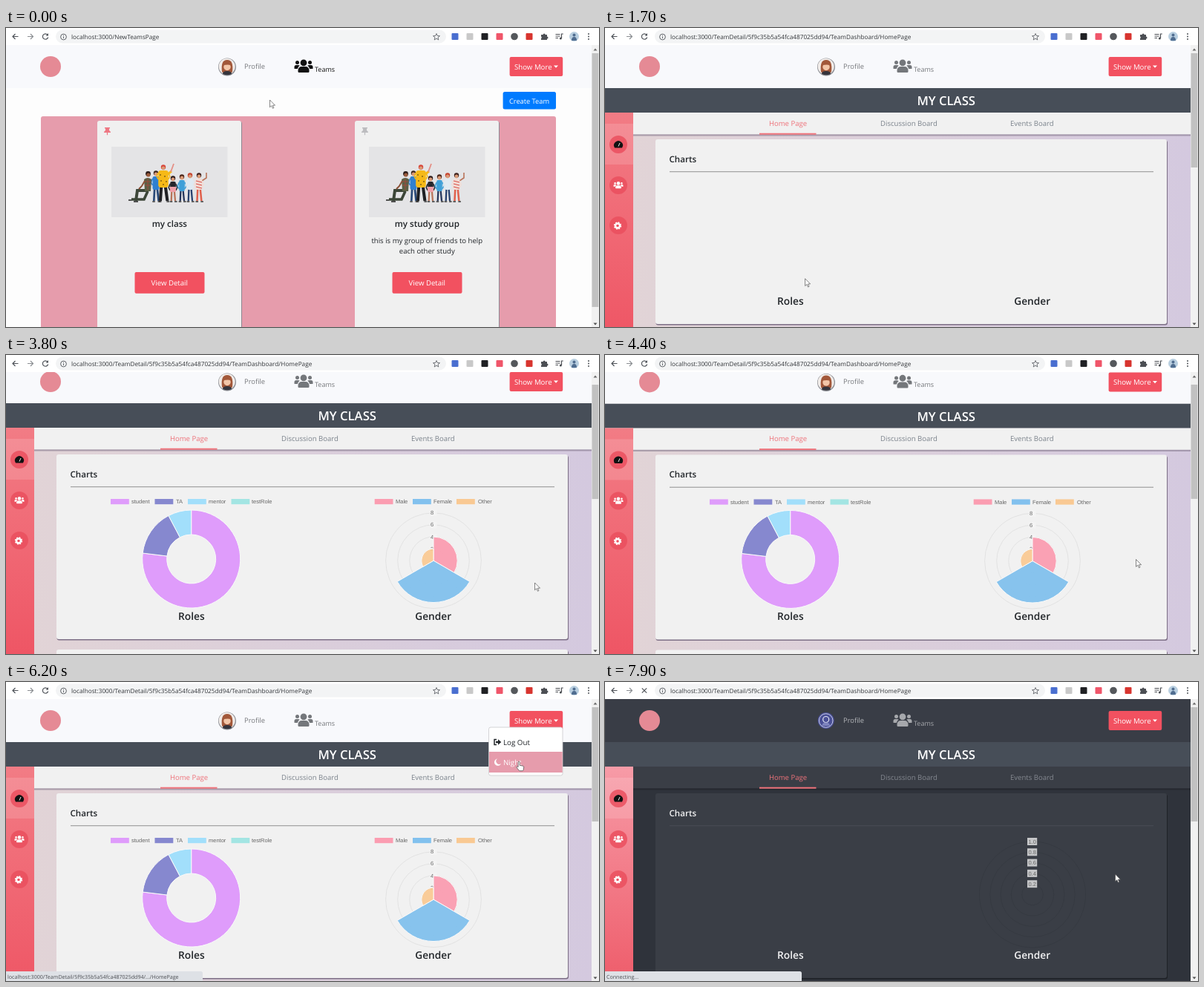
An HTML page that plays this animation: 799 px wide and 403 px high, repeating every 8000 ms.

```html
<!DOCTYPE html>
<html lang="en">
<head>
<meta charset="utf-8">
<title>Team dashboard</title>
<style>
html, body { margin: 0; width: 100%; height: 100%; overflow: hidden; background: #fff; }
svg { display: block; width: 100vw; height: 100vh; text-rendering: geometricPrecision;
  font-family: "Open Sans", "Noto Sans", sans-serif;
  --nav: #f8f9fc; --ink: #212529; --dim: #77797d; --tab: #7a828b; --panel: #f1f1f1; --line: #858585;
  --bar: #474e58; --shade: #7d6f86; --teams: #111; }
svg.dash { --teams: #74777b; }
svg.night { --nav: #393d46; --ink: #f3f3f4; --dim: #b4b6ba; --tab: #858991; --panel: #3a3e46;
  --line: #4a4e57; --shade: #1f2227; --teams: #a6a8ac; }
.b { font-weight: 600; }
.arial { font-family: "Liberation Sans", Arial, sans-serif; font-size: 7.5px; fill: #666; }
.mid { text-anchor: middle; }
.page2 { fill: url(#lilac); }
.night .page2 { fill: #2f333b; }
.rail { fill: url(#coral); }
.night .rail { fill: url(#rose); }
.hot { fill: #fa717c; }
.cool { fill: #f25160; }
</style>
</head>
<body>
<svg id="stage" viewBox="0 0 799 403" preserveAspectRatio="none"></svg>
<script>
const stage = document.getElementById('stage');
const LOOP = 8000;

// ---- drawing helpers
const rect = (x, y, w, h, fill, more = '') =>
  `<rect x="${x}" y="${y}" width="${w}" height="${h}" fill="${fill}" ${more}/>`;
const circle = (x, y, r, fill, more = '') => `<circle cx="${x}" cy="${y}" r="${r}" fill="${fill}" ${more}/>`;
const path = (d, fill = 'none', more = '') => `<path d="${d}" fill="${fill}" ${more}/>`;
const line = (d, color, w) => path(d, 'none', `stroke="${color}" stroke-width="${w}"`);
const text = (x, y, size, str, fill = 'var(--ink)', cls = '') =>
  `<text x="${x}" y="${y}" class="${cls}" style="font-size:${size}px;fill:${fill}">${str}</text>`;
const small = (x, y, str, cls = '') => `<text x="${x}" y="${y}" class="arial ${cls}">${str}</text>`;
const group = (id, body, more = '') => `<g id="${id}" ${more}>${body}</g>`;
const put = (x, y, body, scale = 1) => `<g transform="translate(${x} ${y}) scale(${scale})">${body}</g>`;

const users = fill => `<g fill="${fill}">
  <circle cx="12.5" cy="4.6" r="4.4"/><circle cx="4" cy="4.4" r="2.5"/><circle cx="21" cy="4.4" r="2.5"/>
  <path d="M5 16.5v-2a4.6 4.6 0 0 1 4.6-4.6h5.8a4.6 4.6 0 0 1 4.6 4.6v2q0 1.3-1.3 1.3H6.3Q5 17.8 5 16.5z
  M0 12.3v-2a2.6 2.6 0 0 1 2.6-2.6h2.6q1.2 0 2 .8-2.2 1.3-2.8 4.300H.8Q0 12.8 0 12.3z
  M25 12.3v-2a2.6 2.6 0 0 0-2.6-2.6h-2.6q-1.2 0-2 .8 2.2 1.3 2.8 4.3h3.600q.8 0 .8-.5z"/></g>`;

function polar(cx, cy, r, a) {
  const k = (a - 90) * Math.PI / 180;
  return (cx + r * Math.cos(k)).toFixed(2) + ' ' + (cy + r * Math.sin(k)).toFixed(2);
}
function sector(cx, cy, r0, r1, a0, a1) {
  const big = a1 - a0 > 180 ? 1 : 0, p = (r, a) => polar(cx, cy, r, a);
  return `M${p(r1, a0)}A${r1} ${r1} 0 ${big} 1 ${p(r1, a1)}L${p(r0, a1)}` +
    (r0 ? `A${r0} ${r0} 0 ${big} 0 ${p(r0, a0)}z` : 'z');
}

// ---- browser frame
function toolbar() {
  const ext = [[605, '#4a6fd0'], [625, '#c9c9c9'], [645, '#202124'], [665, '#f0566a'], [685, '#55585c'], [705, '#d8352f']];
  const dark = '#50545a';
  return rect(0, 0, 799, 23, '#fff') + rect(67, 2.5, 526, 18, '#f3f4f5', 'rx="9"') +
    line('M16.5 11.5H9M12.5 8L9 11.5L12.5 15', dark, 1.2) +
    line('M29 11.5H36.5M33 8L36.5 11.5L33 15', '#8b8e92', 1.2) +
    group('reload', line('M56 9.2A3.7 3.7 0 1 0 56.7 12.5', dark, 1.2) + path('M57 7v3.5h-3.5z', dark)) +
    group('stop', line('M49.8 8.3L56.2 14.7M56.2 8.3L49.8 14.7', dark, 1.2)) +
    circle(77.5, 12, 3.9, 'none', `stroke="${dark}" stroke-width=".9"`) + line('M77.5 11.5v2.5M77.5 9.6v1', dark, .9) +
    group('urlA', text(88, 15, 8.2, 'localhost:3000/NewTeamsPage', '#33363a')) +
    group('urlB', text(88, 15, 8.24, 'localhost:3000/TeamDetail/5f9c35b5a54fca487025dd94/TeamDashboard/HomePage', '#33363a')) +
    path('M580 7.5l1.3 3 3.2.2-2.5 2.1.8 3.2-2.8-1.8-2.8 1.8.8-3.2-2.5-2.1 3.2-.2z', 'none', `stroke="${dark}" stroke-width=".8"`) +
    ext.map(([x, c], i) => i == 4 ? circle(x, 11.5, 4.8, c)
      : rect(x - 4.5, 7, 9, 9, c, `rx="1" ${i == 5 ? 'id="badge"' : ''}`)).join('') +
    group('blank', rect(700.5, 7, 9, 9, '#f1f1f1', 'stroke="#ddd" stroke-width=".6"')) +
    path('M721 9h2.6a1.5 1.5 0 0 1 3 0H729v2.6a1.5 1.5 0 0 1 0 3V16h-8v-2a1.5 1.5 0 0 0 0-2.6z', '#4c4f54') +
    line('M740.5 8.5h6M740.5 11h6M740.5 13.5h3.5M748.5 14V8h2.3', '#4c4f54', 1.2) + circle(747.3, 14, 1.5, '#4c4f54') +
    circle(765.5, 11.5, 6.5, '#b9cfe0') + path('M762 17q0-5 3.5-5t3.5 5z', '#506d90') + circle(765.5, 9.5, 2, '#506d90') +
    [8, 11.5, 15].map(y => circle(785, y, 1, dark)).join('');
}

function scrollbar() {
  return rect(789, 23, 10, 380, '#f1f1f1') + path('M791.5 30.5l2.5-3 2.5 3z', '#6a6a6a') +
    path('M791.5 397.5l2.5 3 2.5-3z', '#505050') + rect(789.5, 34, 8.8, 154, '#c1c1c1', 'id="thumb"');
}

function status() {
  return group('status', path('M0 390H262.5q2.5 0 2.5 2.5V403H0z', '#dee1e6') +
    group('link', text(2, 400.3, 7.1, 'localhost:3000/TeamDetail/5f9c35b5a54fca487025dd94/.../HomePage', '#4a4d52')) +
    group('wait', text(2, 400.3, 7.1, 'Connecting...', '#4a4d52')));
}

// ---- page pieces
function nav() {
  return rect(0, 23, 789, 58, 'var(--nav)') + circle(60, 52, 14, '#e58a95') +
    group('face', circle(298, 52.5, 12, '#8d8f95') + circle(297.7, 52, 11, '#f1ece9') +
      path('M291 59q-2-16 7-16t7 16l-2 2h-10z', '#a2583a') + circle(298, 52.5, 4.7, '#f3c6a8') +
      path('M293 50q2-4 5-3.5t5 3.5q-4-1-10 0z', '#a2583a') + path('M292 62q0-4 6-4t6 4q-6 2.5-12 0z', '#34343c')) +
    group('blankFace', circle(297.7, 52, 11, '#4a5096') + circle(297.7, 52, 9.3, 'none', 'stroke="#d9dcf2" stroke-width=".9"') +
      circle(297.7, 50.5, 4, 'none', 'stroke="#e6e8f6" stroke-width="1.2"') + path('M292.5 59q0-4.5 5.2-4.5t5.2 4.5', '#7d83bd')) +
    text(321, 54.5, 9.35, 'Profile', 'var(--dim)') + put(388.5, 42.2, users('var(--teams)')) +
    text(416, 58.8, 9, 'Teams', 'var(--teams)') +
    rect(678.6, 39, 71.6, 26, '', 'id="more" rx="2"') + text(685, 56, 9.66, 'Show More', '#fff') + path('M738 50.5h6l-3 3.3z', '#fff');
}

// x, head y, hip y, half width, top, legs, hair
const crowd = [
  [202, 196, 216, 4.5, '#2f80d0', '#2a4a78', '#3a241c'],
  [212, 188, 213, 6.8, '#f6b917', '#1f2024', '#d8453a'],
  [225, 203, 216, 3.8, '#26262c', '#b9745a', '#2a1a1a'],
  [237, 201, 218, 3.8, '#3fa0d8', '#26365c', '#4a2418'],
  [248, 199, 216, 3.8, '#dfeaf2', '#27416f', '#c5402c'],
  [260, 199, 216, 4.2, '#f2ddd6', '#e0604c', '#3b1f1c']
];
function person([x, y, hip, w, top, legs, hair]) {
  return line(`M${x - w * .4} ${hip}L${x - w * .6} 233M${x + w * .4} ${hip}L${x + w * .8} 233`, legs, w * .6) +
    rect(x - w, y + 4, w * 2, hip - y - 2, top, `rx="${w * .5}"`) +
    line(`M${x - w} ${y + 7}l-2 5 2 4M${x + w} ${y + 7}l2 5-2 4`, top, 1.6) +
    circle(x, y - .6, 3.2, hair) + circle(x, y + 1, 2.4, '#d99a77') +
    line(`M${x - w * .6 - 2} 234h3.5M${x + w * .8 - 1} 234h3.5`, '#333', 1.3);
}
function picture() {
  const dots = [[208, 198], [214, 200], [209, 206], [216, 207], [212, 211]];
  return rect(142, 160, 156.5, 95, '#e4e4e6') +
    line('M218 197L223 193', '#f6b917', 3) + line('M222 194L226 183', '#e48f86', 1.8) + line('M264 206L270 202V195', '#b9745a', 1.6) +
    crowd.map(person).join('') + dots.map(([x, y]) => circle(x, y, .9, '#7a5a10')).join('') +
    rect(221, 214, 8, 7, '#ef9fa8', 'rx="1"') + line('M256 206l8 2M256 210l8 2M256 214l8 2', '#d9534a', 1.2) +
    line('M192 219L177 219L175 233', '#3c4638', 4) + line('M191 220L186 231H169', '#3c4638', 3.6) + line('M172 234h6M165 232h4', '#222', 1.5) +
    path('M186 204q5-4 10 0l-1 16h-8z', '#5b6046') + line('M187 207h8M187 212h8M191 203v15', '#a8483c', .9) +
    line('M187 206l-4 7-4 4', '#8a4f35', 2) + circle(191.5, 196.5, 3.4, '#2a1b18') + circle(191.8, 198, 2.6, '#9a5b3c');
}
const pin = fill => path('M-3.5-5h7v1.5h-1.2l.5 3q1.8.9 1.8 2.5H.6V5.2h-1.2V2h-4q0-1.6 1.8-2.5l.5-3h-1.2z', fill);

function teamCard(dx, pinColor, title, lines, id) {
  return `<g transform="translate(${dx} 0)">` + rect(124, 126, 194, 400, '#8d8791', 'rx="3"') +
    rect(123, 125, 194, 400, '#f0f0f0', 'rx="3"') + put(136.5, 139, pin(pinColor)) + picture() +
    text(220.3, 268, 11.6, title, 'var(--ink)', 'b mid') +
    lines.map((s, i) => text(220.3, 289.5 + i * 14.8, 9.57, s, 'var(--ink)', 'mid')).join('') +
    `<rect x="173.5" y="329" width="94" height="28.8" rx="2" class="cool" id="${id}"/>` +
    text(220.3, 347.3, 9.65, 'View Detail', '#fff', 'mid') + '</g>';
}
function teams() {
  return rect(0, 80, 789, 330, '#fdfdfd') + rect(669.6, 86, 71.4, 23.4, '#007bff', 'rx="2.5"') +
    text(678, 101.6, 9.25, 'Create Team', '#fff') + rect(47, 119, 694, 300, '#e69cac', 'rx="3"') +
    teamCard(0, '#ee7783', 'my class', [], 'view1') +
    teamCard(347, '#bcbcbf', 'my study group', ['this is my group of friends to help', 'each other study'], 'view2');
}

const legend = rows => rows.map(([x, tx, c, s]) => rect(x, 210, 24.8, 7.2, c) + small(tx, 216.2, s)).join('');
const panel = (y, h) => rect(68.5, y + 1.5, 689.5, h, 'var(--shade)', 'rx="3"') + rect(68, y, 689, h, 'var(--panel)', 'rx="3"');

function dash() {
  const knob = y => circle(18, y, 12, '#ea4f5e', 'opacity=".85"');
  const rings = (cy, step, n, c) => Array.from({ length: n }, (_, i) =>
    circle(576, cy, step * (i + 1), 'none', `stroke="${c}" stroke-width=".7"`)).join('');
  return '<rect y="114" width="789" height="500" class="page2"/>' +
    rect(38, 115, 751, 30.5, 'var(--shade)', 'opacity=".55"') + rect(38, 114, 751, 29.3, 'var(--panel)') +
    rect(0, 81, 789, 33, 'var(--bar)') + group('heading', text(459.7, 104.3, 16.7, 'MY CLASS', '#fff', 'b mid')) +
    '<rect y="114" width="38" height="500" class="rail"/>' + rect(0, 129, 38, 55, '#fff', 'opacity=".14"') +
    [157, 212, 266].map(knob).join('') +
    path('M13 161.5a6 6 0 1 1 10 0z', '#111') + line('M18 159.5l2-4.5', '#fff', .9) +
    put(11.5, 207, users('#fff'), .52) +
    circle(17, 266.5, 3, 'none', 'stroke="#fff" stroke-width="2.4"') +
    circle(17, 266.5, 4.5, 'none', 'stroke="#fff" stroke-width="1.4" stroke-dasharray="2 1.534"') +
    text(246.5, 132, 9.55, 'Home Page', '#ee737b', 'mid') + text(409.5, 132, 9.55, 'Discussion Board', 'var(--tab)', 'mid') +
    text(575.3, 132, 9.55, 'Events Board', 'var(--tab)', 'mid') + rect(208, 141.7, 76.5, 2, '#ee737b') +
    group('cards', panel(150, 249) + panel(413, 200) +
      text(86.5, 181, 11.6, 'Charts', 'var(--ink)', 'b') + rect(87, 193.3, 652, .9, 'var(--line)') +
      text(249.8, 372.5, 13.75, 'Roles', 'var(--ink)', 'b mid') + text(575.7, 372.8, 13.7, 'Gender', 'var(--ink)', 'b mid')) +
    group('charts',
      legend([[141, 169, '#df9cfb', 'student'], [200.5, 229, '#8688cf', 'TA'], [245, 273, '#a2dffb', 'mentor'], [303.5, 331, '#a3e5e3', 'testRole'],
        [496.7, 525, '#fb9db1', 'Male'], [548, 576, '#82c1ee', 'Female'], [607, 636, '#f9c993', 'Other']]) +
      rings(293.2, 16.1, 4, '#dcdcdc') +
      [8, 6, 4, 2].map((n, i) => rect(571.5, 225 + i * 16.1, 9, 8, '#f4f4f4') + small(574, 231.3 + i * 16.1, n, 'mid')).join('') +
      '<g id="roles" stroke="#fafafa"></g><g id="gender" stroke="#fafafa"></g>' +
      group('tip', path('M235.5 311h47q2.5 0 2.5 2.5v2.5l4 2.5-4 2.5v2.5q0 2.5-2.5 2.5h-47q-2.5 0-2.5-2.5v-10q0-2.5 2.5-2.5z', '#000', 'opacity=".8"') +
        rect(236.3, 314.5, 7.4, 7.6, '#df9cfb', 'stroke="#fff" stroke-width=".7"') +
        '<text x="245" y="321" class="arial" style="fill:#fff">student: 10</text>')) +
    group('empty', rings(286.5, 14.3, 5, '#343840') + ['1.0', '0.8', '0.6', '0.4', '0.2'].map((s, i) =>
      rect(569, 210 + i * 14.3, 13.2, 10, '#c6c7c9') + small(575.6, 217.7 + i * 14.3, s, 'mid')).join(''));
}

function menu() {
  return group('menu', rect(650.5, 61, 99.5, 65, '#fff', 'rx="2.5" stroke="#c9c9cc" stroke-width=".8"') +
    rect(651, 94, 98.7, 28, '#e69cac') +
    line('M661 77.5h-3v7h3', '#212529', 1.5) + path('M660 79.7h3v-2.5l4.3 3.8-4.3 3.8v-2.5h-3z', '#212529') +
    text(670, 84.5, 9.75, 'Log Out', '#212529') +
    path('M662 103.5a4.7 4.7 0 1 0 5 6.5 4 4 0 0 1-5-6.5z', '#fff') + text(670, 112, 9.75, 'Night', '#fff'));
}

const pointer = group('cursor',
  group('arrow', path('M0 0V9.8L2.3 7.7 3.9 11.3 5.4 10.6 3.9 7.2H7z', '#fff', 'stroke="#444" stroke-width=".65"')) +
  group('beam', line('M-2.5-5.5q2.5 0 2.5 1.5V4q0 1.5-2.5 1.5M2.5-5.5Q0-5.5 0-4V4q0 1.5 2.5 1.5', '#333', 1)) +
  group('hand', path('M0 0q1 0 1 1v4l4.5 1q1.3.4 1.1 1.7L5.9 11.5q-.3 1-1.2 1H1.2q-.8 0-1.3-.7L-3 8q-.5-1 .4-1.4L-1 7.3V1Q-1 0 0 0z', '#fff', 'stroke="#444" stroke-width=".7"')));

const grad = (id, a, b, dir) => `<linearGradient id="${id}" ${dir}><stop stop-color="${a}"/><stop offset="1" stop-color="${b}"/></linearGradient>`;
stage.innerHTML = '<defs>' + grad('lilac', '#e2d4d6', '#d4c9df', 'x2="1"') + grad('coral', '#f27c85', '#ee5060', 'x2="0" y2=".7"') +
  grad('rose', '#f79ba7', '#ee5b69', 'x2="0" y2=".6"') + '</defs>' +
  group('page', group('teams', teams()) + group('dash', dash()) + nav() + menu()) +
  scrollbar() + toolbar() + status() + pointer;

// ---- motion
const CURSOR = [[0, 355.5, 97], [900, 258, 348], [1500, 258, 348], [2000, 291, 319], [2400, 431.5, 302], [3200, 431.5, 302],
  [3800, 712.5, 307], [4200, 712.5, 307], [5100, 736.5, 57.5], [5400, 736.5, 57.5], [6300, 689.5, 109], [7400, 689.5, 109], [7900, 687.5, 259]];
const SCROLL = [[3500, 0], [3800, 16], [4000, 24], [4200, 24], [4700, 0]];
const clamp = v => Math.max(0, Math.min(1, v));

function track(rows, t) {
  let i = 0;
  while (i < rows.length - 2 && t >= rows[i + 1][0]) i++;
  const a = rows[i], b = rows[i + 1], p = clamp((t - a[0]) / (b[0] - a[0])), e = p * p * (3 - 2 * p);
  return a.slice(1).map((v, k) => v + (b[k + 1] - v) * e);
}
const $ = Object.fromEntries([...stage.querySelectorAll('[id]')].map(el => [el.id, el]));
const show = (id, on) => { $[id].style.display = on ? '' : 'none'; };
const within = (t, a, b) => t >= a && t < b;
const quart = p => 1 - (1 - clamp(p)) ** 4;

function drawCharts(t) {
  const p = quart((t - 1930) / 1000), q = quart((t - 1995) / 1000);
  let a = 0;
  const slices = [[10, within(t, 2100, 2700) ? '#cf7cf5' : '#df9cfb'], [2, '#8688cf'], [1, '#a2dffb']];
  $.roles.innerHTML = p ? slices.map(([n, c]) => {
    const from = a;
    a += n / 13 * 360 * p;
    return path(sector(249.7, 291, 33, 66, from, a), c);
  }).join('') : '';
  $.gender.innerHTML = q ? [[4, '#fb9db1'], [7, '#82c1ee'], [2, '#f9c993']].map(([n, c], i) =>
    path(sector(576, 293.2, 0, n * 8.05 * q, i * 120 * q, (i + 1) * 120 * q), c, 'fill-opacity=".95"')).join('') : '';
}

function draw(t) {
  const inDash = t >= 1400, night = t >= 7500, loading = t >= 6900;
  const [scroll] = track(SCROLL, t), [x, y] = track(CURSOR, t);
  stage.classList.toggle('dash', inDash);
  stage.classList.toggle('night', night);
  show('teams', !inDash);
  show('dash', inDash);
  show('heading', t >= 1600);
  show('cards', t >= 1600);
  show('charts', t >= 1800 && !night);
  show('empty', t >= 7700);
  show('face', !night);
  show('blankFace', night);
  show('menu', within(t, 5100, 6500));
  show('urlA', t < 1100);
  show('urlB', t >= 1100);
  show('reload', !loading);
  show('stop', loading);
  show('blank', within(t, 7100, 7600));
  show('badge', !within(t, 7100, 7600));
  const linked = within(t, 900, 1400) || within(t, 5100, 6300), waiting = t >= 7000;
  show('status', linked || waiting);
  show('link', linked);
  show('wait', waiting);
  $.view1.setAttribute('class', within(t, 800, 1400) ? 'hot' : 'cool');
  $.more.setAttribute('class', within(t, 5000, 5700) ? 'hot' : 'cool');
  $.page.setAttribute('transform', `translate(0 ${-scroll})`);
  $.thumb.setAttribute('height', inDash ? 154 : 342);
  $.thumb.setAttribute('y', 34 + scroll * .38);
  show('tip', within(t, 2100, 2700));
  $.tip.setAttribute('opacity', clamp((2700 - t) / 200));
  drawCharts(t);
  const kind = within(t, 800, 1500) ? 'beam' : within(t, 4900, 6400) ? 'hand' : 'arrow';
  for (const k of ['arrow', 'beam', 'hand']) show(k, k == kind);
  $.cursor.setAttribute('transform', `translate(${x} ${y})`);
}

// The picture advances ten times a second.
const start = performance.now();
let last = -1;
function tick(now) {
  const t = Math.floor(Math.max(0, now - start) % LOOP / 100 + .001) * 100;
  if (t != last) draw(last = t);
  requestAnimationFrame(tick);
}
draw(0);
requestAnimationFrame(tick);
</script>
</body>
</html>
```
